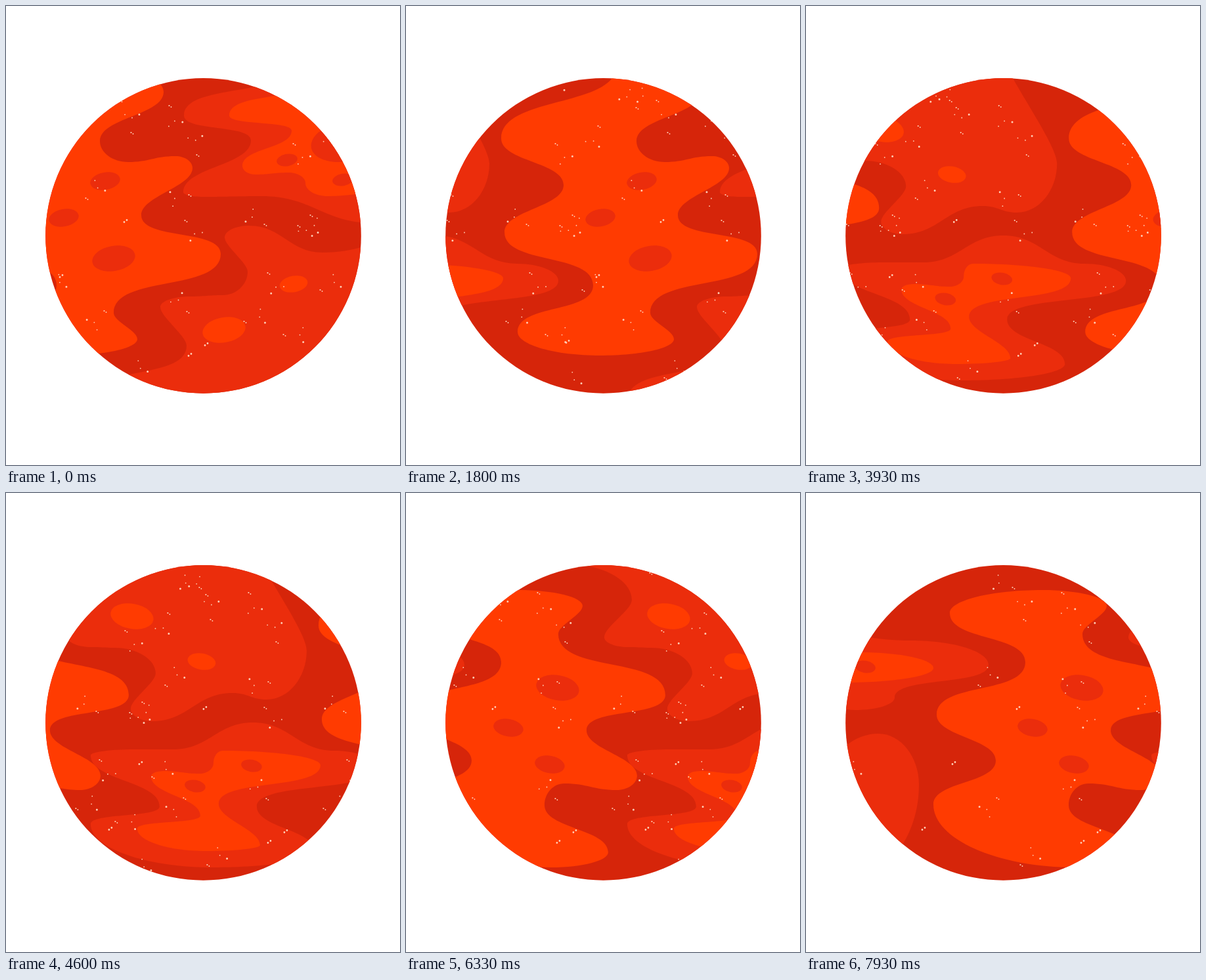
Recreate the animation shown at these times as an HTML page with a canvas. Size 600 px wide and 700 px high, loop 8000 ms.

```html
<!DOCTYPE html>
<html lang="en">
<head>
<meta charset="utf-8">
<title>Rotating planet</title>
<style>
html, body { margin: 0; width: 100%; height: 100%; overflow: hidden; background: #fff; }
canvas { display: block; }
</style>
</head>
<body>
<canvas id="stage" width="600" height="700"></canvas>
<script>
const ctx = document.getElementById('stage').getContext('2d');
const LOOP = 8000, SLOT = 1000 / 15, STEP = 104 / 11;
const BRIGHT = '#ff3b01', MID = '#eb2d0c', DARK = '#d6250a', STAR = '#ffcdb5';
const layers = [];

// Length of a curve handle: wide, flat waves bulge more than steep ones.
function bulge(a, b) {
  if (a.flat !== b.flat) return 0.55;
  if (a.flat) return 0.45;
  return Math.min(0.65, 0.37 * Math.abs((b.x - a.x) / (b.y - a.y)));
}

// Closed coast given by its turning points. The outline runs upright through
// each of them, or level where the point is written with a third entry.
function land(color, shift, turns) {
  const keys = turns.map(([x, y, flat]) => ({ x: x - shift, y, flat: !!flat }));
  const path = new Path2D();
  path.moveTo(keys[0].x, keys[0].y);
  keys.forEach((a, i) => {
    const b = keys[(i + 1) % keys.length];
    const k = bulge(a, b), dx = (b.x - a.x) * k, dy = (b.y - a.y) * k;
    path.bezierCurveTo(
      a.x + (a.flat ? dx : 0), a.y + (a.flat ? 0 : dy),
      b.x - (b.flat ? dx : 0), b.y - (b.flat ? 0 : dy), b.x, b.y);
  });
  path.closePath();
  layers.push([color, path]);
}

// Craters lean one way in the west and the other way in the east.
function spot(color, r, ...places) {
  const path = new Path2D();
  for (const [x, y] of places) {
    const tilt = x < 0 ? 0.18 : -0.18;
    path.moveTo(x + r * Math.cos(tilt), y + r * Math.sin(tilt));
    path.ellipse(x, y, r, r * 0.58, tilt, 0, 2 * Math.PI);
  }
  layers.push([color, path]);
}

// Far west
land(MID, 936, [[60, 203], [160, 225, 1], [278, 262], [135, 312], [75, 331, 1], [20, 300]]);
land(BRIGHT, 936, [[20, 265], [82, 243, 1], [194, 267], [60, 289, 1]]);
land(MID, 936, [[20, 480], [110, 367, 1], [172, 445], [60, 590, 1]]);
land(BRIGHT, 936, [[458, 172], [360, 148, 1], [219, 183], [334, 258], [199, 338], [289, 408],
  [194, 475], [410, 571, 1], [497, 548], [400, 476], [430, 443, 1], [510, 453, 1], [541, 431],
  [464, 362], [584, 308], [421, 215]]);

// Middle, north and south
land(MID, 624, [[120, 108, 1], [221, 163], [179, 220], [215, 235, 1], [250, 236, 1], [313, 275],
  [275, 329], [308, 348, 1], [430, 305, 1], [482, 315, 1], [543, 240], [455, 60]]);
land(MID, 624, [[214, 400], [280, 391, 1], [340, 391, 1], [461, 350, 1], [585, 393, 1], [648, 419],
  [467, 478], [555, 546], [400, 571, 1], [214, 505], [319, 478]]);
land(BRIGHT, 624, [[306, 432], [325, 424, 1], [380, 428, 1], [401, 412], [415, 393, 1], [564, 415],
  [409, 474], [472, 537], [390, 546, 1], [285, 512], [381, 492]]);

// Great bright continent
land(BRIGHT, 312, [[425, 90], [249, 202], [344, 273], [254, 345], [389, 426], [274, 497],
  [400, 533, 1], [512, 508], [476, 468], [639, 378], [518, 319], [596, 247], [570, 229, 1],
  [498, 238, 1], [455, 206], [552, 131], [510, 106, 1]]);

// Far east
land(MID, 0, [[430, 90], [271, 167], [373, 205], [270, 284], [300, 291, 1], [390, 290, 1],
  [560, 331, 1], [640, 200]]);
land(BRIGHT, 0, [[460, 110], [340, 167], [435, 190], [360, 244], [380, 257, 1], [430, 254, 1],
  [456, 270], [490, 290, 1], [640, 220]]);
land(MID, 0, [[600, 360, 1], [482, 376, 1], [370, 335, 1], [333, 353], [368, 405], [330, 441, 1],
  [280, 443, 1], [235, 459], [275, 518], [130, 600], [640, 640]]);

spot(MID, 33, [-516, 297], [164, 385]);
spot(MID, 23, [-591, 358], [-528, 414], [151, 267], [88, 323]);
spot(MID, 16, [-846, 265], [-165, 416], [-251, 447], [428, 235], [513, 265]);
spot(MID, 52, [516, 207]);
spot(BRIGHT, 33, [-347, 188], [332, 494]);
spot(BRIGHT, 21.5, [-241, 257], [438, 424]);

// Star dust: one small constellation, turned and mirrored, laid over the
// surface several times. A negative bearing means the mirrored form.
const dust = new Path2D();
function star(x, y, r) {
  dust.moveTo(x + r, y);
  dust.arc(x, y, r, 0, 2 * Math.PI);
}
function constellation(x, y, bearing) {
  const turn = Math.sign(bearing) * 21;
  star(x - 1.5, y - 1, 1.1);
  star(x + 1.5, y + 1, 0.9);
  [[30.5, 1.5], [23.5, 0.9], [30.5, 0.9]].forEach(([d, r], i) => {
    const a = (Math.abs(bearing) + turn * i) * Math.PI / 180;
    star(x + d * Math.cos(a), y + d * Math.sin(a), r);
  });
}
const groups = [
  [175, 145, 178], [421, 123, -10], [562, 156, 207], [192, 194, -291], [250, 153, 52],
  [292, 228, -283], [439, 211, 37], [504, 184, 90], [123, 294, -336], [280, 289, -190],
  [395, 334, 190], [274, 328, -77], [465, 320, 88], [446, 336, -18], [400, 408, -83],
  [480, 434, -349], [277, 467, -253], [151, 466, -156], [364, 482, -362], [424, 502, -20],
  [448, 585, -342], [187, 568, -340]
];
const twins = [[84, 412], [38, 512], [280, 532], [305, 516], [182, 328]];
for (const dx of [0, -418, -795, -1362]) {
  for (const [x, y, bearing] of groups) constellation(x + dx, y, bearing);
  for (const [x, y] of twins) {
    star(x + dx - 2, y + 1.5, 1.4);
    star(x + dx + 2, y - 1.5, 1.4);
  }
}
layers.push([STAR, dust]);

function draw(now) {
  // The surface turns 12.5 times a second, shown on a 15-per-second grid.
  const slot = Math.min(119, Math.floor((now % LOOP + 4) / SLOT));
  const step = Math.floor(slot * 5 / 6);
  ctx.fillStyle = '#fff';
  ctx.fillRect(0, 0, 600, 700);
  ctx.save();
  ctx.beginPath();
  ctx.arc(300.5, 350.4, 240.3, 0, 2 * Math.PI);
  ctx.clip();
  ctx.fillStyle = DARK;
  ctx.fillRect(0, 0, 600, 700);
  ctx.translate(step * STEP, 0);
  for (const [color, path] of layers) {
    ctx.fillStyle = color;
    ctx.fill(path);
  }
  ctx.restore();
}

const start = performance.now();
function tick() {
  draw(performance.now() - start);
  requestAnimationFrame(tick);
}
tick();
</script>
</body>
</html>
```
